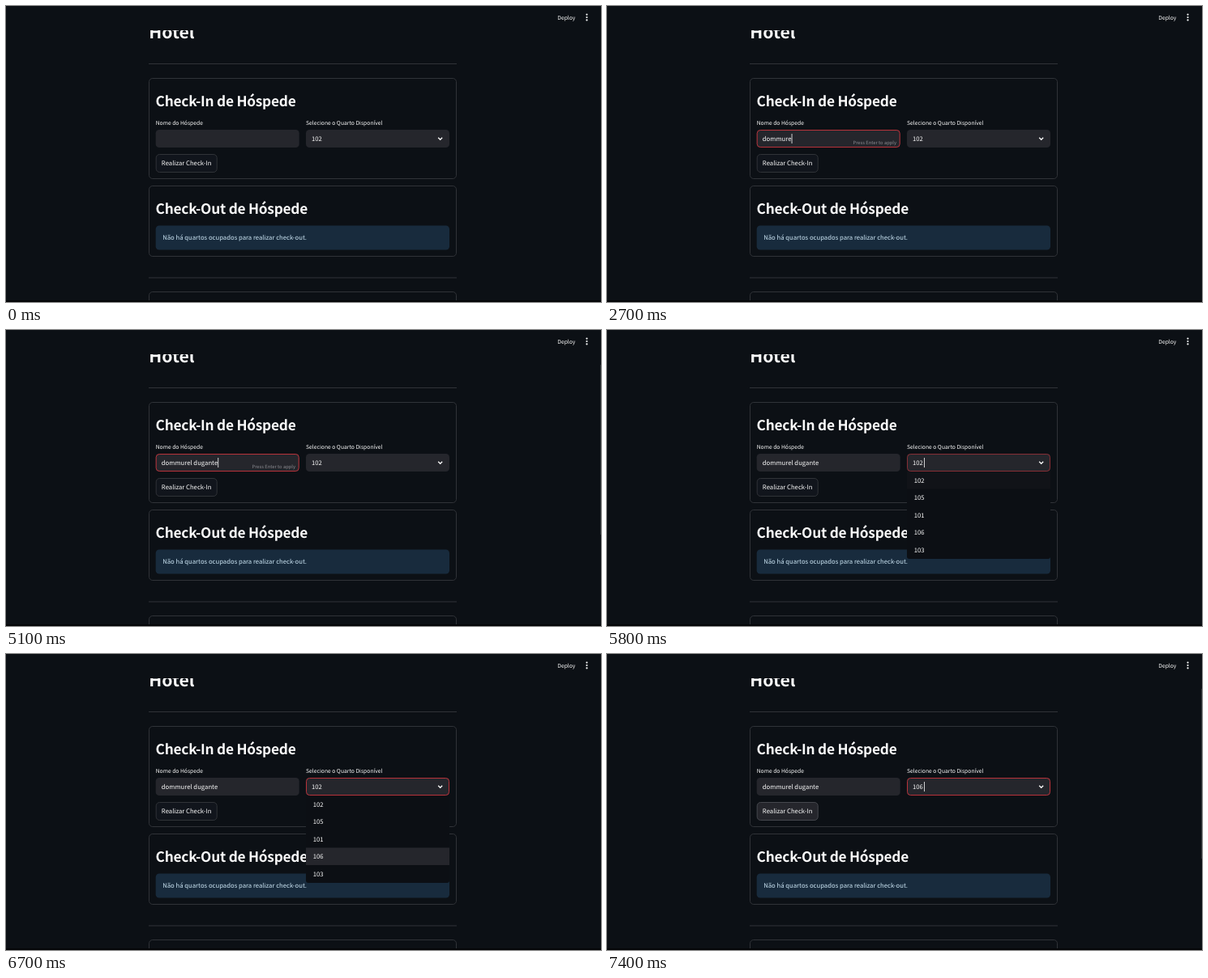
Recreate the animation shown at these times as an HTML page. Size 734x366 px, loop 8 s.

```html
<!DOCTYPE html>
<html lang="pt">
<head>
<meta charset="utf-8">
<title>Check-In</title>
<style>
html, body { margin: 0; width: 100%; height: 100%; overflow: hidden; background: #0c1015; }
svg { display: block; width: 734px; height: 366px; }
text {
  font: 7.72px "Noto Sans CJK JP", "Noto Sans CJK SC", "Noto Sans CJK", "Open Sans", sans-serif;
  fill: #fafafa; white-space: pre; text-rendering: geometricPrecision;
}
.h1 { font-size: 21.2px; font-weight: 700; }
.h2 { font-size: 17.3px; font-weight: 700; letter-spacing: -.014em; }
.small { font-size: 6.76px; }
.hint { font-size: 5.79px; fill: #8b8c91; text-anchor: end; }
.line { fill: none; stroke: #303338; }
.field { fill: #25262c; }
.focus { fill: none; stroke: #b8323a; }
.caret { fill: #fafafa; }
</style>
</head>
<body>
<svg viewBox="0 0 734 366">
  <text class="h1" x="176.2" y="40">Hotel</text>
  <rect width="734" height="30" fill="#0c1015"/>
  <text class="small" x="680.3" y="16.6">Deploy</text>
  <g fill="#fafafa">
    <circle cx="716.5" cy="10.6" r="1.1"/><circle cx="716.5" cy="14" r="1.1"/><circle cx="716.5" cy="17.4" r="1.1"/>
  </g>

  <g class="line">
    <path d="M176 71.5H556M176 336H556"/>
    <rect x="176.5" y="89.5" width="379" height="124" rx="4.3"/>
    <rect x="176.5" y="222.5" width="379" height="87" rx="4.3"/>
    <rect x="176.5" y="353.5" width="379" height="40" rx="4.3"/>
  </g>

  <text class="h2" x="184.6" y="124.4">Check-In de Hóspede</text>
  <text class="small" x="184.7" y="147.2">Nome do Hóspede</text>
  <text class="small" x="370.1" y="147.2">Selecione o Quarto Disponível</text>

  <rect class="field" x="184.7" y="153" width="177" height="22" rx="4.3"/>
  <rect class="focus" id="nameFocus" x="185.2" y="153.5" width="176" height="21" rx="4"/>
  <text id="name" x="191.8" y="167"></text>
  <text class="hint" id="hint" x="357" y="170.8">Press Enter to apply</text>
  <rect class="caret" id="nameCaret" y="158" width=".8" height="12"/>

  <rect class="field" x="370" y="153" width="177" height="22" rx="4.3"/>
  <rect class="focus" id="roomFocus" x="370.5" y="153.5" width="176" height="21" rx="4"/>
  <text id="room" x="377" y="167"></text>
  <rect class="caret" id="roomCaret" x="391" y="158" width=".8" height="12"/>
  <path d="M533.2 162.8l2.5 2.5 2.5-2.5" fill="none" stroke="#fafafa" stroke-width="1.3"/>

  <rect id="button" x="185.2" y="183.5" width="75" height="22" rx="4.3"/>
  <text x="222.6" y="197.1" text-anchor="middle">Realizar Check-In</text>

  <text class="h2" x="184.6" y="257.4">Check-Out de Hóspede</text>
  <rect x="184.7" y="271.5" width="362.3" height="30" rx="4.3" fill="#182b3d"/>
  <text x="193.2" y="289.2" style="fill:#cde6f5">Não há quartos ocupados para realizar check-out.</text>

  <g id="menu"><rect x="370" y="175" width="177" height="108" rx="3" fill="#0c0f14"/></g>
  <rect id="thumb" x="733" y="43" width="1" height="210" fill="#2b3032"/>
  <rect y="364" width="734" height="2" fill="#050608"/>
</svg>
<script>
const $ = id => document.getElementById(id);
const LOOP = 8000, STEP = 100, FADE = 250;
const guest = "dommurel dugante";
// [time, letters typed so far]
const typing = [[2000, 1], [2100, 2], [2300, 4], [2500, 5], [2600, 6], [2700, 7], [2800, 8],
  [3000, 9], [3300, 10], [3400, 11], [3600, 13], [4000, 14], [4200, 15], [4300, 16]];
const hovers = { 0: [5750, 6020], 1: [6110, 6420], 3: [6450, 6900] };

const ramp = (t, start, length) => Math.min(1, Math.max(0, (t - start) / length));
const pulse = (t, [on, off], length) => ramp(t, on, length) - ramp(t, off, length);
const within = (t, from, to) => t >= from && t < to;
const show = (id, amount) => $(id).setAttribute("opacity", Number(amount));

function add(tag, attrs, label = "") {
  const el = document.createElementNS("http://www.w3.org/2000/svg", tag);
  for (const key in attrs) el.setAttribute(key, attrs[key]);
  el.textContent = label;
  return $("menu").appendChild(el);
}

const rows = ["102", "105", "101", "106", "103"].map((label, i) => {
  const y = 175 + i * 21.5;
  const back = add("rect", { class: "field", x: 370, y, width: 177, height: 21.5 });
  add("text", { x: 378.7, y: y + 13.7 }, label);
  return back;
});

function draw(t) {
  const typed = typing.reduce((n, [at, count]) => t >= at ? count : n, 0);
  $("name").textContent = guest.slice(0, typed);
  const end = typed ? $("name").getComputedTextLength() : 0;
  $("nameCaret").setAttribute("x", 192 + end);
  show("nameCaret", within(t, 1000, 5700));
  show("nameFocus", ramp(t, 900, 300) - ramp(t, 5600, 200));
  show("hint", within(t, 2000, 5700));

  $("room").textContent = t < 6800 ? "102" : "106";
  show("roomFocus", ramp(t, 5600, 300));
  show("roomCaret", within(t, 5700, 6500) || t >= 6800);
  show("menu", ramp(t, 5600, 200) - ramp(t, 6700, 200));
  rows.forEach((row, i) => row.setAttribute("opacity", hovers[i] ? pulse(t, hovers[i], FADE) : 0));

  const hot = t >= 7400;
  $("button").setAttribute("fill", hot ? "#25262c" : "#11151c");
  $("button").setAttribute("stroke", hot ? "#45474d" : "#303338");
  show("thumb", within(t, 500, 2000) || within(t, 5100, 5700) || t >= 6800);
}

const begin = performance.now();
function tick() {
  const t = (performance.now() - begin) % LOOP;
  draw(Math.floor(t / STEP) * STEP);
  requestAnimationFrame(tick);
}
tick();
</script>
</body>
</html>
```
